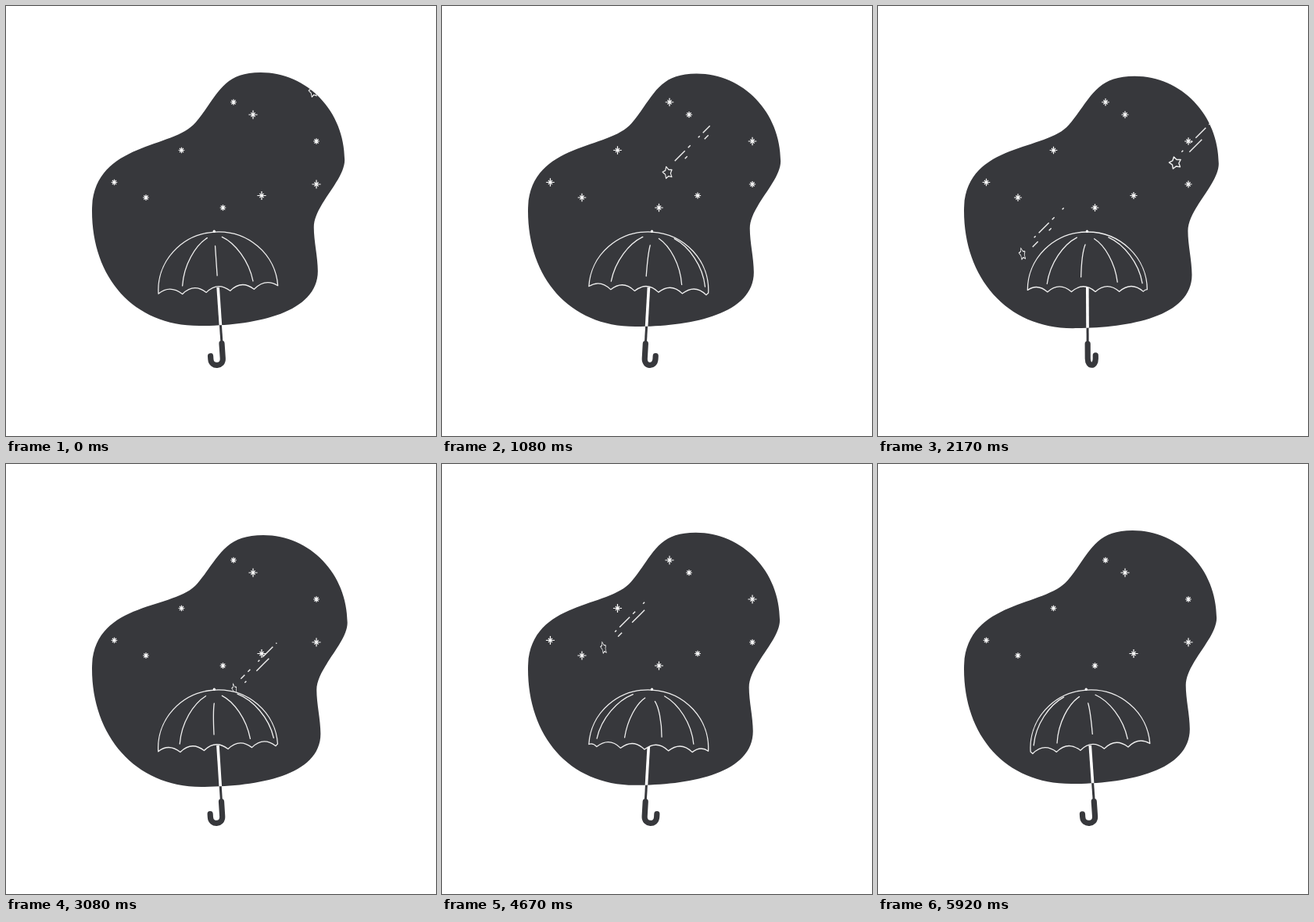
Write an HTML page that moves like this. It is 550 by 550 pixels and loops after 6010 ms.

```html
<!DOCTYPE html>
<html lang="en">
<head>
<meta charset="utf-8">
<title>Umbrella under a night sky</title>
<style>
html, body { margin: 0; width: 100%; height: 100%; overflow: hidden; background: #fff; }
svg { display: block; width: 100%; height: 100%; }
</style>
</head>
<body>
<svg viewBox="0 0 550 550" fill="none" stroke-linejoin="round">
  <clipPath id="inside"><path class="blob"/></clipPath>
  <path class="blob" fill="#37383c"/>
  <g clip-path="url(#inside)">
    <g id="sky" stroke="#fff" stroke-width="1.2"></g>
    <g id="comets" stroke="#f0f0f0" stroke-width="1.4"></g>
  </g>
  <g class="sway" stroke="#37383c">
    <path d="M0 90V124" stroke-width="3"/>
    <path id="hook" stroke-width="7.2" stroke-linecap="round"/>
  </g>
  <g clip-path="url(#inside)">
    <g class="sway"><path d="M0 54V124" stroke="#fff" stroke-width="3.6"/></g>
  </g>
  <g class="sway" stroke="#f0f0f0" stroke-width="1.3">
    <path id="canopy" fill="#37383c"/>
    <g id="ribs" stroke-linecap="round"></g>
    <circle cy="-17.8" r="1.7" fill="#fff" stroke="none"/>
  </g>
</svg>
<script>
const LOOP = 6010, FPS = 12, FRAMES = 72;
const { PI, sin, cos, abs, sign, floor, min, max } = Math;
const $ = id => document.getElementById(id);
const all = sel => [...document.querySelectorAll(sel)];
const rad = deg => deg * PI / 180;
const mod = (a, n) => ((a % n) + n) % n;
const wave = (t, period, peak = 0) => cos(2 * PI * (t - peak) / period);
const set = (el, attrs) => { for (const k in attrs) el.setAttribute(k, attrs[k]); };
const show = on => on ? "visible" : "hidden";
const add = (parent, tag, attrs = {}) => {
  const el = document.createElementNS("http://www.w3.org/2000/svg", tag);
  set(el, attrs);
  return parent.appendChild(el);
};

// Blob nodes: x, y, direction of travel, handle before, handle after
const nodes = [
  [326.5, 88, 0, 50, 60], [434, 200, 90, 62, 26], [394.6, 286, 90, 28, 18],
  [399.7, 342, 90, 18, 55], [248, 411, 180, 68, 85], [110, 262, 270, 85, 88],
  [243, 151, -50, 45, 45]
];
const blobs = all(".blob");

function drawBlob(t) {
  const p = wave(t, 6, 3.3), q = wave(t, 6, 1.8), r = wave(t, 3, -0.1);
  // the left edge stays put, the rest drifts
  const pts = nodes.map(([x, y, deg, before, after]) => {
    const w = min(1, (x - 110) / 215), c = cos(rad(deg)), s = sin(rad(deg));
    const px = x + w * (1.5 * p + 1.3 * q + r), py = y + w * (3 * p + 0.7 * q);
    return {
      at: [px, py],
      pre: [px - before * c, py - before * s],
      post: [px + after * c, py + after * s]
    };
  });
  const d = pts.reduce((path, a, i) => {
    const b = pts[(i + 1) % pts.length];
    return path + "C" + [a.post, b.pre, b.at];
  }, "M" + pts[0].at) + "Z";
  blobs.forEach(el => set(el, { d }));
}

// Twinkles: one group grows while the other shrinks
const groups = {
  "1": [[316, 139], [327, 242.5], [397, 228]],
  "-1": [[291, 123], [397, 173], [224.5, 184.5], [138.5, 225.5], [179, 245], [277.5, 258]]
};
const twinkles = Object.entries(groups).flatMap(([s, spots]) => spots.map(([x, y]) =>
  ({ s: +s, el: add($("sky"), "path", { transform: `translate(${x} ${y})` }) })));

function drawTwinkles(t) {
  for (const { s, el } of twinkles) {
    const r = 4.7 + 0.9 * s * wave(t, 3), k = 2.6;
    set(el, { d: `M${-r} 0H${r}M0 ${-r}V${r}M${-k} ${-k}L${k} ${k}M${-k} ${k}L${k} ${-k}` });
  }
}

// Falling stars: place at time t0, end time, turn, phase of both trail lines
const SPEED = 96, DRIFT = 11, TAIL = 54;
const comets = [
  { t0: 1.08, x: 289, y: 213, end: 2.75, turn: 290, near: 3, far: -8 },
  { t0: 2.17, x: 380, y: 201, end: 4.5, turn: 0, near: 20, far: 18 },
  { t0: 4.08, x: 263, y: 179, end: 5.8, turn: 112, near: 8, far: 30 }
];
const starPath = "M" + Array.from({ length: 10 }, (_, i) => {
  const r = i % 2 ? 4.5 : 8, a = rad(36 * i - 90);
  return [r * cos(a), r * sin(a)];
}).join("L") + "Z";

// A dashed line up and right, measured in x
function addTrail(g, x, shift, dash) {
  const el = add(g, "path", {
    d: `M${x} ${shift - x}L${TAIL} ${shift - TAIL}`,
    pathLength: TAIL - x, "stroke-dasharray": dash.join(" ")
  });
  const cycle = dash.reduce((a, b) => a + b);
  return phase => set(el, { "stroke-dashoffset": mod(x - phase, cycle) });
}
for (const c of comets) {
  c.g = add($("comets"), "g");
  c.star = add(c.g, "path", { d: starPath });
  c.flowNear = addTrail(c.g, 8, -6, [2, 4, 13, 4, 3, 10]);
  c.flowFar = addTrail(c.g, 13, 4, [16, 14, 3, 22, 5, 13]);
}

function drawComets(t) {
  for (const c of comets) {
    const age = t - c.t0, go = SPEED * age;
    set(c.g, {
      transform: `translate(${c.x - go} ${c.y + go})`,
      visibility: show(t < c.end)
    });
    set(c.star, { transform: `rotate(-14) scale(${0.7 + 0.3 * cos(rad(c.turn + 180 * age))} 1)` });
    c.flowNear(c.near + DRIFT * age);
    c.flowFar(c.far + DRIFT * age);
  }
}

// Umbrella, in coordinates around its sway pivot; it turns one rib per second
const HALF = 76.5, STEP = HALF * 0.4, RIB = 36;
const sways = all(".sway");
const ribs = Array.from({ length: 5 }, () => add($("ribs"), "path"));

function canopyPath(turn) {
  let d = `M${-HALF} 57A${HALF} 74 0 0 1 ${HALF} 57`, x = HALF;
  for (let next = HALF - turn * STEP; x > -HALF; next -= STEP) {
    const to = max(next, -HALF), w = x - to;
    if (w < 0.5) continue;
    d += `Q${(x + to) / 2} ${59 - 13 * w / STEP} ${to} ${to > -HALF ? 59.5 : 57}`;
    x = to;
  }
  return d + "Z";
}

function ribPath(deg) {
  const a = abs(deg), s = sign(deg), f = min(1, a / RIB);
  const x0 = s * (9.5 * sin(f * PI / 2) + 21.5 * max(0, a / RIB - 1));
  const x1 = 77 * sin(rad(deg)), y0 = 1 - 11 * f, y1 = 39 + 10 * f;
  const dx = x1 - x0, dy = y1 - y0;
  return `M${x0} ${y0}C${x0 + 0.45 * dx} ${y0 + 0.15 * dy} ${x1 - 0.1 * dx} ${y1 - 0.45 * dy} ${x1} ${y1}`;
}

function drawUmbrella(t) {
  const turn = mod(t, 1), tilt = -4 * wave(t, 3, 2.88);
  sways.forEach(g => set(g, { transform: `translate(267.5 306) rotate(${tilt})` }));
  set($("canopy"), { d: canopyPath(turn) });
  ribs.forEach((el, i) => {
    const deg = RIB * (2 - i - turn);
    set(el, { d: ribPath(deg), visibility: show(abs(deg) < 71) });
  });
  const x = -16.5 * sin(1.95 * wave(t, 3, 0.08));
  set($("hook"), { d: `M0 126V145C0 156 ${x} 156 ${x} 145V141` });
}

function draw(ms) {
  const t = floor((ms % LOOP + 5) * FPS / 1000) % FRAMES / FPS;
  drawBlob(t);
  drawTwinkles(t);
  drawComets(t);
  drawUmbrella(t);
}

const start = performance.now();
function tick() {
  draw(performance.now() - start);
  requestAnimationFrame(tick);
}
tick();
</script>
</body>
</html>
```
